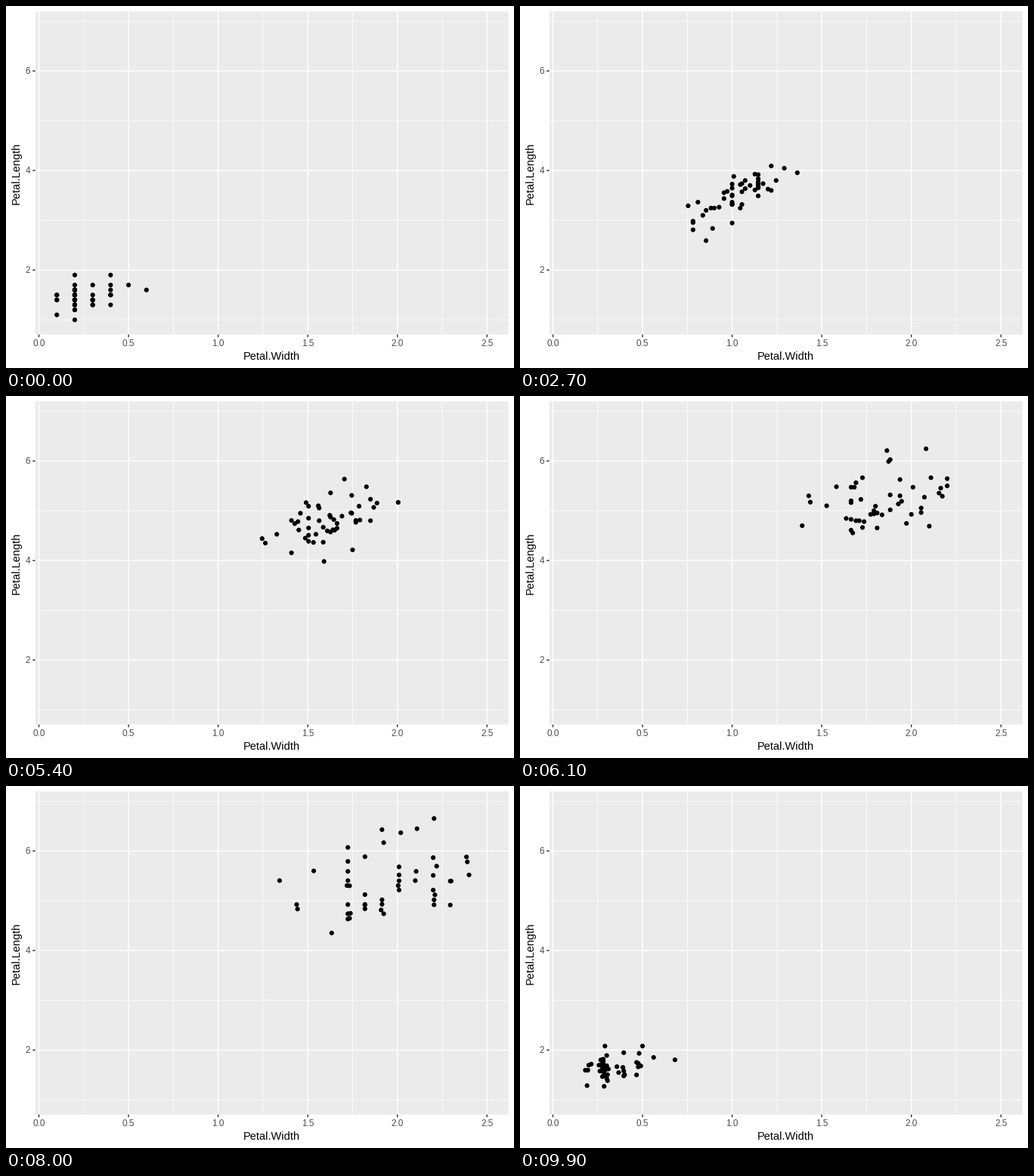
A matplotlib script for the animation above (10 s loop, 672 px wide and 480 px high).

```python
import numpy as np
import matplotlib.pyplot as plt
from matplotlib.animation import FuncAnimation
from matplotlib.patches import Rectangle

W, H, DPI = 672, 480, 96
PT = 72 / DPI  # points per pixel
LEFT, RIGHT, TOP, BOTTOM = 38.8, 664.7, 7.3, 435.6
X0, X1, Y0, Y1 = -0.02, 2.62, 0.705, 7.195

# Petal sizes in millimetres, one column per species and measure.
SETOSA_W = [2, 2, 2, 2, 2, 4, 3, 2, 2, 1, 2, 2, 1, 1, 2, 4, 4, 3, 3, 3,
            2, 4, 2, 5, 2, 2, 4, 2, 2, 2, 2, 4, 1, 2, 2, 2, 2, 1, 2, 2,
            3, 3, 2, 6, 4, 3, 2, 2, 2, 2]
SETOSA_L = [14, 14, 13, 15, 14, 17, 14, 15, 14, 15,
            15, 16, 14, 11, 12, 15, 13, 14, 17, 15,
            17, 15, 10, 17, 19, 16, 16, 15, 14, 16,
            16, 15, 15, 14, 15, 12, 13, 14, 13, 15,
            13, 13, 13, 16, 19, 14, 16, 14, 15, 14]
VERSICOLOR_W = [14, 15, 15, 13, 15, 13, 16, 10, 13, 14,
                10, 15, 10, 14, 13, 14, 15, 10, 15, 11,
                18, 13, 15, 12, 13, 14, 14, 17, 15, 10,
                11, 10, 12, 16, 15, 16, 15, 13, 13, 13,
                12, 14, 12, 10, 13, 12, 13, 13, 11, 13]
VERSICOLOR_L = [47, 45, 49, 40, 46, 45, 47, 33, 46, 39,
                35, 42, 40, 47, 36, 44, 45, 41, 45, 39,
                48, 40, 49, 47, 43, 44, 48, 50, 45, 35,
                38, 37, 39, 51, 45, 45, 47, 44, 41, 40,
                44, 46, 40, 33, 42, 42, 42, 43, 30, 41]
VIRGINICA_W = [25, 19, 21, 18, 22, 21, 17, 18, 18, 25,
               20, 19, 21, 20, 24, 23, 18, 22, 23, 15,
               23, 20, 20, 18, 21, 18, 18, 18, 21, 16,
               19, 20, 22, 15, 14, 23, 24, 18, 18, 21,
               24, 23, 19, 23, 25, 23, 19, 20, 23, 18]
VIRGINICA_L = [60, 51, 59, 56, 58, 66, 45, 63, 58, 61,
               51, 53, 55, 50, 51, 53, 55, 67, 69, 50,
               57, 49, 67, 49, 57, 60, 48, 49, 56, 58,
               61, 64, 56, 51, 56, 61, 56, 55, 48, 54,
               56, 51, 51, 59, 57, 52, 50, 52, 54, 51]

plt.rcParams["font.family"] = "Liberation Sans"


def px(x):
    return LEFT + (x - X0) / (X1 - X0) * (RIGHT - LEFT)


def py(y):
    return BOTTOM - (y - Y0) / (Y1 - Y0) * (BOTTOM - TOP)


def to_pixels(widths, lengths):
    return np.column_stack([px(np.array(widths) / 10), py(np.array(lengths) / 10)])


STATES = [to_pixels(SETOSA_W, SETOSA_L),
          to_pixels(VERSICOLOR_W, VERSICOLOR_L),
          to_pixels(VIRGINICA_W, VIRGINICA_L)]

fig = plt.figure(figsize=(W / DPI, H / DPI), dpi=DPI, facecolor="white")
ax = fig.add_axes([0, 0, 1, 1])
ax.set(xlim=(0, W), ylim=(H, 0))
ax.axis("off")


def line(xs, ys, width, color, z):
    ax.plot(xs, ys, color=color, lw=width * PT, solid_capstyle="butt",
            snap=False, zorder=z)


def label(x, y, text, size, color, ha="center", rotation=0):
    ax.text(x, y, text, fontsize=size, color=color, ha=ha, va="baseline",
            rotation=rotation, rotation_mode="anchor")


def vline(x, width, z):
    line([px(x)] * 2, [TOP, BOTTOM], width, "white", z)


def hline(y, width, z):
    line([LEFT, RIGHT], [py(y)] * 2, width, "white", z)


ax.add_patch(Rectangle((LEFT, TOP), RIGHT - LEFT, BOTTOM - TOP,
                       fc="#ebebeb", lw=0, snap=False, zorder=0))

for x in np.arange(0.25, 2.5, 0.5):
    vline(x, 0.71, 1)
for y in (1, 3, 5, 7):
    hline(y, 0.71, 1)

for x in np.arange(0, 2.6, 0.5):
    vline(x, 1.42, 2)
    line([px(x)] * 2, [BOTTOM, BOTTOM + 3.65], 1.42, "#333333", 3)
    label(px(x), 451, f"{x:.1f}", 8.8, "#4d4d4d")
for y in (2, 4, 6):
    hline(y, 1.42, 2)
    line([LEFT - 3.65, LEFT], [py(y)] * 2, 1.42, "#333333", 3)
    label(32.2, py(y) + 4.2, str(y), 8.8, "#4d4d4d", ha="right")

label((LEFT + RIGHT) / 2, 469, "Petal.Width", 11, "black")
label(18, (TOP + BOTTOM) / 2, "Petal.Length", 11, "black", rotation=90)

# One size per dot keeps their positions free of pixel rounding.
dots = ax.scatter(*STATES[0].T, s=np.full(50, (5.2 * PT) ** 2), c="black",
                  edgecolors="black", linewidths=0.945 * PT, zorder=5)


def update(frame):
    phase = np.interp(frame, [11, 33, 45, 67, 79, 100], [0, 1, 1, 2, 2, 3])
    i = int(phase)
    t = phase - i
    start, end = STATES[i], STATES[(i + 1) % 3]
    dots.set_offsets(start + (end - start) * t)
    return dots,


anim = FuncAnimation(fig, update, frames=100, interval=100, repeat=True,
                     repeat_delay=0)
plt.show()
```
